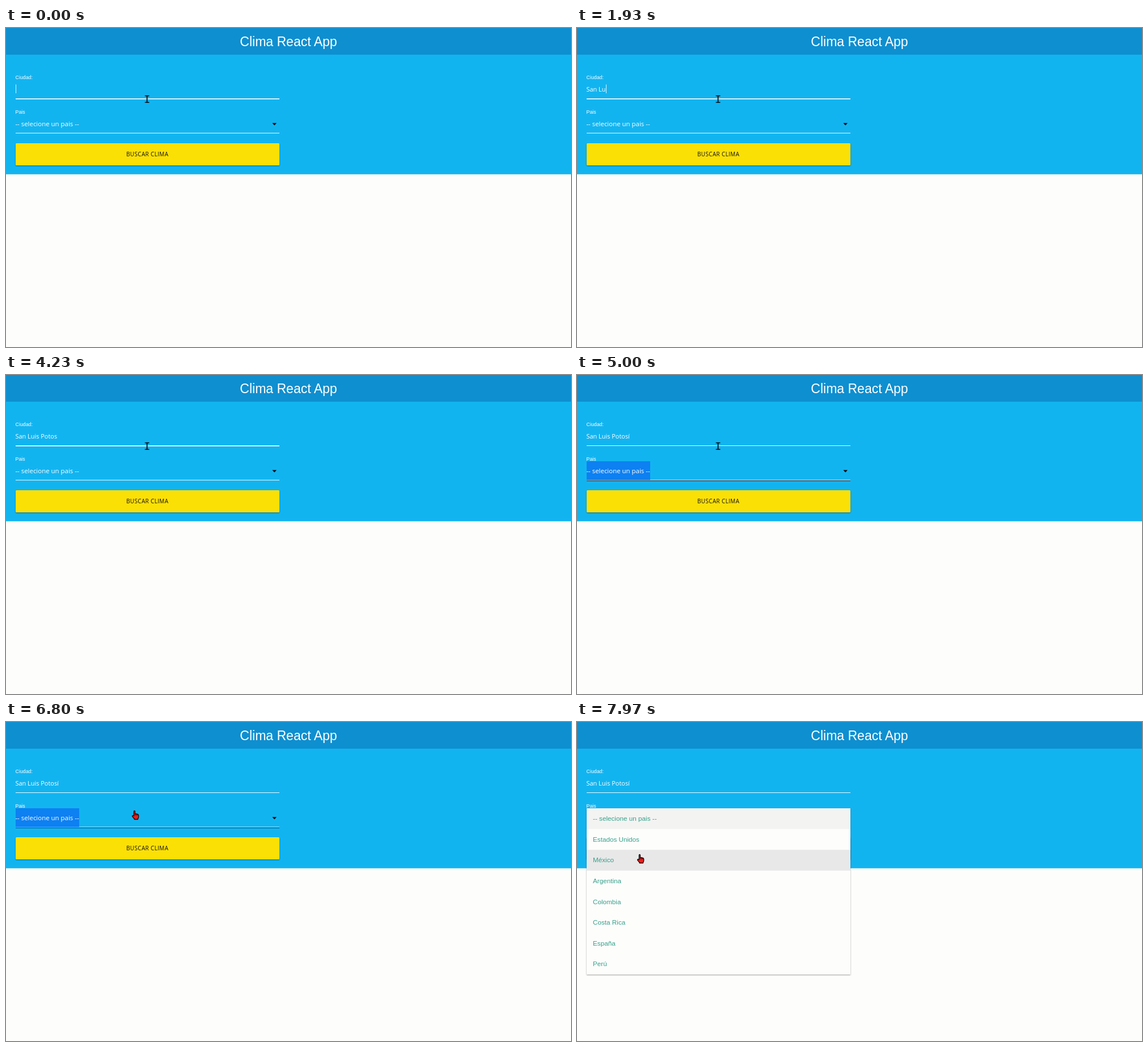
Recreate the animation shown at these times as an HTML page. Size 996 by 562 pixels, loop 8000 ms.

```html
<!DOCTYPE html>
<html lang="es">
<head>
<meta charset="utf-8">
<title>Clima React App</title>
<style>
html, body { margin: 0; width: 100%; height: 100%; overflow: hidden; background: #fdfdfc; }
svg { display: block; width: 100vw; height: 100vh; }
text { fill: #fff; white-space: pre; }
.sans { font-family: "Liberation Sans", Arial, sans-serif; }
.ui { font-family: "Open Sans", "Noto Sans", sans-serif; }
.title { font-size: 23px; text-anchor: middle; }
.label { font-size: 8.8px; }
.field { font-size: 10.95px; }
.select { font-size: 11.45px; }
.button { font-size: 9.95px; letter-spacing: .366px; text-anchor: middle; fill: #111; }
.raised { filter: drop-shadow(0 1px 1px rgba(0, 0, 0, .38)); }
#items text { font-size: 11.71px; fill: #36a08a; }

.city-focus, .country-focus, .ibeam, .hand, .hover-1, .hover-2 {
  animation: 8s step-end infinite;
}
.city-focus { animation-name: cityFocus; }
.country-focus { animation-name: countryFocus; }
.ibeam { animation-name: ibeam; }
.hand { animation-name: hand; }
.hover-1 { animation-name: hover1; }
.hover-2 { animation-name: hover2; }
.pointer { animation: move 8s linear infinite; }
.menu { transform-origin: 17px 152px; animation: open 8s linear infinite; }

@keyframes cityFocus { 0% { opacity: 1 } 60.6%, 100% { opacity: 0 } }
@keyframes countryFocus { 0% { opacity: 0 } 60.6%, 100% { opacity: 1 } }
@keyframes ibeam { 0% { opacity: 1 } 82.2%, 100% { opacity: 0 } }
@keyframes hand { 0% { opacity: 0 } 82.2%, 100% { opacity: 1 } }
@keyframes hover1 { 0% { opacity: 0 } 94.5% { opacity: 1 } 97.7%, 100% { opacity: 0 } }
@keyframes hover2 { 0% { opacity: 0 } 97.7%, 100% { opacity: 1 } }
@keyframes move {
  0% { transform: translate(248.5px, 125px) }
  78.75% { transform: translate(248.5px, 125px); animation-timing-function: ease-in-out }
  83.75% { transform: translate(228px, 164px) }
  89.5% { transform: translate(228px, 164px) }
  91.5% { transform: translate(218px, 173px) }
  92.5% { transform: translate(218px, 173px) }
  98.5%, 100% { transform: translate(112px, 241px) }
}
@keyframes open {
  0%, 88% { opacity: 0; transform: scale(.3); animation-timing-function: cubic-bezier(.22, 1, .36, 1) }
  90%, 100% { opacity: 1; transform: none }
}
</style>
</head>
<body>
<svg viewBox="0 0 996 562" preserveAspectRatio="none">
  <rect width="996" height="562" fill="#fdfdfc"/>
  <rect width="996" height="257.7" fill="#12b4f0"/>
  <rect width="996" height="47" fill="#0e8fd0"/>
  <text class="sans title" x="498" y="31.5">Clima React App</text>

  <text class="sans label" x="16.6" y="90">Ciudad:</text>
  <text class="ui field" id="city" x="16.4" y="112"></text>
  <rect id="caret" y="99.5" width="1" height="15.5" fill="#fff"/>
  <rect x="17" y="124" width="465" height="1" fill="#fff" opacity=".9"/>
  <rect class="city-focus" x="17" y="124" width="465" height="1.6" fill="#fff"/>

  <text class="sans label" x="16.6" y="151.3">Pais</text>
  <rect x="17" y="184.7" width="465" height="1" fill="#fff" opacity=".95"/>
  <g class="country-focus">
    <rect x="17" y="152" width="112" height="33" fill="#0d80f2"/>
    <rect x="17" y="185.8" width="465" height="1" fill="#123"/>
  </g>
  <text class="ui select" x="16.4" y="173.4">-- selecione un pais --</text>
  <path d="M469.4 167.6h7.6l-3.8 3.8z" fill="#000"/>

  <rect class="raised" x="17" y="203" width="465" height="39" rx="1.5" fill="#fbe006"/>
  <text class="ui button" x="249.2" y="226">BUSCAR CLIMA</text>

  <g class="menu">
    <rect class="raised" x="17" y="152" width="465" height="292.8" fill="#fdfdfc"/>
    <rect x="17" y="152" width="465" height="36.6" fill="#f3f3f2"/>
    <rect class="hover-1" x="17" y="188.6" width="465" height="36.6" fill="#e8e8e8"/>
    <rect class="hover-2" x="17" y="225.2" width="465" height="36.6" fill="#e8e8e8"/>
    <g id="items" class="sans"></g>
  </g>

  <g class="pointer">
    <path class="ibeam" d="M-3.5-5.5h7.4M-3.5 6h7.4M.2-5.5V6" fill="none" stroke="#000" stroke-width="1.7"/>
    <g class="hand" stroke="#190808" stroke-linejoin="round">
      <path d="M-2.6 1.5V-6.3q0-1.2 1-1.2t1.1 1.2v3.7l4.6 1q1.6.4 1.6 2v2.8q0 1.8-1.2 3.2v1.1h-6.3v-1L-5.2 2.6q-.7-1.2.3-1.8 1-.4 2.3.7z" fill="#ee1c1c" stroke-width="1.3"/>
      <path d="M-.5-2.6V.8M1.6-2.1V.8M3.7-1.6V.9" fill="none" stroke-width=".9"/>
    </g>
  </g>
</svg>
<script>
const LOOP = 8000, TAB_TIME = 4850, BLINK = 500;
const CITY = "San Luis Potosí";
const keyTimes = [900, 1050, 1200, 1350, 1650, 1830, 2050, 2200, 2350, 2750, 2950, 3150, 3300, 3500, 4550];
const countries = ["-- selecione un pais --", "Estados Unidos", "México", "Argentina",
  "Colombia", "Costa Rica", "España", "Perú"];

const city = document.getElementById("city");
const caret = document.getElementById("caret");

document.getElementById("items").innerHTML = countries
  .map((name, i) => `<text x="28" y="${(174.2 + i * 36.6).toFixed(1)}">${name}</text>`)
  .join("");

function render(t) {
  const typed = keyTimes.filter(time => time <= t).length;
  const lastKey = typed ? keyTimes[typed - 1] : 0;
  const text = CITY.slice(0, typed);
  if (city.textContent !== text) city.textContent = text;
  const width = typed ? city.getComputedTextLength() : 0;
  caret.setAttribute("x", Math.round(16.6 + width));
  const visible = t < TAB_TIME && (t - lastKey) % (2 * BLINK) < BLINK;
  caret.setAttribute("opacity", visible ? .85 : 0);
}

let start;
function tick(now) {
  start ??= now;
  render((now - start) % LOOP);
  requestAnimationFrame(tick);
}
render(0);
requestAnimationFrame(tick);
</script>
</body>
</html>
```
